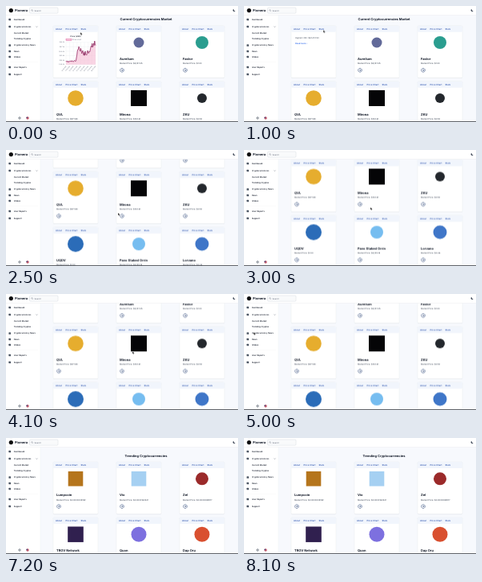
These frames come from a looping animation (290 by 146 pixels, 8200 ms). An HTML page:

```html
<!DOCTYPE html>
<html lang="en">
<head>
<meta charset="utf-8">
<title>Crypto dashboard</title>
<style>
html, body { margin: 0; width: 100%; height: 100%; overflow: hidden; background: #fff; }
svg { display: block; width: 290px; height: 146px; }
text { font-family: Inter, Roboto, sans-serif; text-rendering: geometricPrecision; }
.timed { opacity: 0; animation: 8.2s step-end infinite; }
#market { animation-name: market; }
#loading { animation-name: loading; }
#trending { animation-name: trending; }
#chart { animation-name: chart; }
#stats { animation-name: stats; }
#status { animation-name: status; }
#hover { animation-name: hover; }
#scroll { animation: scroll 8.2s linear infinite; }
#spinner { transform-origin: 175px 28px; animation: spin 8.2s step-end infinite; }
#cursor { animation: point 8.2s ease-in-out infinite, show 8.2s step-end infinite; }
@keyframes market { 0% { opacity: 1 } 73.171% { opacity: 0 } }
@keyframes loading { 73.171% { opacity: 1 } 86.585% { opacity: 0 } }
@keyframes trending { 86.585%, 100% { opacity: 1 } }
@keyframes chart { 0% { opacity: 1 } 8.537% { opacity: 0 } }
@keyframes stats { 8.537%, 100% { opacity: 1 } }
@keyframes status { 68.293% { opacity: 1 } 80.488% { opacity: 0 } }
@keyframes hover { 65.854% { opacity: 1 } 80.488% { opacity: 0 } }
@keyframes spin { 82.927%, 100% { transform: rotate(90deg) } }
@keyframes scroll {
  0%, 21.951% { transform: translateY(-5.3px) }
  23.171% { transform: translateY(-6.5px) }
  30.488% { transform: translateY(-73px); animation-timing-function: ease-out }
  37.805%, 39.634% { transform: translateY(-88.5px); animation-timing-function: ease-in-out }
  50%, 100% { transform: translateY(-59px) }
}
@keyframes point {
  0% { transform: translate(93px, 33px) }
  6%, 11% { transform: translate(98px, 29px) }
  21.951%, 24% { transform: translate(143px, 78px) }
  30.488% { transform: translate(140px, 79px) }
  36.585%, 51% { transform: translate(158px, 72px) }
  61% { transform: translate(12px, 48px) }
  65.854%, 73.17% { transform: translate(20px, 41px) }
  73.171%, 79% { transform: translate(70px, 69px) }
  80.488%, 100% { transform: translate(71px, 71px) }
}
@keyframes show { 0% { opacity: 1 } 86.585%, 100% { opacity: 0 } }
</style>
</head>
<body>
<svg id="stage" viewBox="0 0 290 146"></svg>
<script>
const INK = '#111827', GREY = '#6b7280', BLUE = '#2f56b0';

const rect = (x, y, w, h, fill, extra = '') =>
  `<rect x="${x}" y="${y}" width="${w}" height="${h}" fill="${fill}" ${extra}/>`;
const dot = (x, y, r, fill, extra = '') =>
  `<circle cx="${x}" cy="${y}" r="${r}" fill="${fill}" ${extra}/>`;
const line = (d, color, width, fill = 'none') =>
  `<path d="${d}" fill="${fill}" stroke="${color}" stroke-width="${width}"/>`;
// y is the visual middle of the line of text
const text = (x, y, size, str, color = INK, weight = 400, anchor = 'start') =>
  `<text x="${x}" y="${y + size * 0.36}" font-size="${size}" fill="${color}" font-weight="${weight}" text-anchor="${anchor}">${str}</text>`;
const group = (attrs, body) => `<g ${attrs}>${body}</g>`;
const heading = (y, str) => text(175, y, 4, str, INK, 650, 'middle');

function priceChart() {
  let seed = 11;
  const random = () => (seed = seed * 16807 % 2147483647) / 2147483647;
  const points = [];
  for (let i = 0; i <= 60; i++) {
    const u = i / 60;
    const base = u < 0.33 ? 45.5 - 3 * u : u < 0.42 ? 44.5 - (u - 0.33) * 190 : 30 + 8 * Math.sin(u * 9 + 2.2) * u;
    points.push(`${(16 + 37 * u).toFixed(2)},${(base + (random() - 0.5) * (u < 0.33 ? 2 : 6)).toFixed(2)}`);
  }
  const path = 'M' + points.join('L');
  let out = text(28, 13, 2.4, 'Price (USD)', INK, 500, 'middle') +
    rect(16, 16.5, 7, 2.4, '#f8cfe0', 'stroke="#d6458f" stroke-width=".4"') +
    text(24, 17.8, 2.2, 'Price chart', GREY);
  for (let i = 0; i < 6; i++) {
    const y = 21 + i * 5.6;
    out += line(`M15 ${y}H53`, '#e5e7eb', 0.3) + text(14, y, 2, `$${(68 - i * 0.8).toFixed(1)}k`, GREY, 400, 'end');
  }
  for (let i = 0; i < 9; i++) {
    const x = 16 + i * 4.6;
    out += line(`M${x} 21V49`, '#e5e7eb', 0.3) +
      group(`transform="translate(${x} 51) rotate(-50)"`, text(0, 0, 1.9, `${10 + i}:00 PM`, GREY, 400, 'end'));
  }
  return out + `<path d="${path}V49H16Z" fill="#f6bfd6" opacity=".65"/>` +
    line(path, '#c93d85', 0.7) + line(path, '#3b1d32', 0.25);
}

const action = line('M7 53.7a2.4 2.4 0 1 0 .01 0M5.9 56.1h2.2M7.2 55.1l1 1-1 1', '#1e3a6e', 0.5);

function coinBody({ name, price, color, shape, size }) {
  const mark = shape === 'square'
    ? rect(28 - size, 21.3 - size, size * 2, size * 2, color)
    : dot(28, 21.3, size, color);
  return mark + text(4, 41.8, 4, name, INK, 650) +
    text(4, 47.8, 2.6, `Market Price: $${price}`, '#374151') + action;
}

const statsBody = text(5, 15, 2.6, 'Highest 24h: $67,412.50', '#4b5563') +
  text(5, 22, 2.6, 'Read more ›', '#2563eb', 500);

function card(body, index) {
  const x = 59 + index % 3 * 79, y = 30 + Math.floor(index / 3) * 70;
  return group(`transform="translate(${x} ${y})"`,
    rect(0, 0.3, 56, 66, '#dfe3ea', 'rx="1.2"') +
    rect(0, 0, 56, 65.8, '#fff', 'rx="1.2" stroke="#e5e7eb" stroke-width=".4"') +
    rect(0, 0, 56, 8, '#f1f5fc', 'rx="1.2"') +
    text(3, 4, 2.8, 'About', BLUE, 500) + text(15.5, 4, 2.8, 'Price Chart', BLUE, 500) +
    text(34.5, 4, 2.8, 'Stats', BLUE, 500) + body);
}

const coin = (name, price, color, size, shape = 'circle') => ({ name, price, color, size, shape });
const marketCoins = [
  coin('Aurelium', '3,127.45', '#626a99', 6.5),
  coin('Fastor', '1.00', '#2a9d8f', 8),
  coin('QVL', '571.83', '#e6ad2e', 9.8),
  coin('Mirona', '142.61', '#050507', 10, 'square'),
  coin('ZKU', '0.52', '#24282d', 6),
  coin('UQDV', '1.00', '#2b6cb8', 10),
  coin('Pavo Staked Orrin', '3,125.18', '#76bdf0', 8),
  coin('Lorvano', '0.46', '#3f76c8', 8.5)
];
const trendingCoins = [
  coin('Lumpcoin', '0.0000003182', '#b5751c', 9.3, 'square'),
  coin('Vio', '0.0000160241', '#a5d0f2', 9.3, 'square'),
  coin('Zel', '0.0000082917', '#9b2a2a', 8),
  coin('TROV Network', '0.0000021', '#30204f', 9.8, 'square'),
  coin('Quon', '0.0000415', '#7d70df', 9.5),
  coin('Dap Oru', '0.0000007', '#d95030', 9.5)
];

const firstCard = group('id="chart" class="timed"', priceChart()) + group('id="stats" class="timed"', statsBody);
const backdrop = rect(43, 11, 247, 135, '#f7f9fd');

const market = group('id="market" class="timed"', backdrop + group('id="scroll"',
  heading(22.3, 'Current Cryptocurrencies Market') +
  [firstCard, ...marketCoins.map(coinBody)].map(card).join('')));

const trending = group('id="trending" class="timed"', backdrop +
  heading(22.5, 'Trending Cryptocurrencies') + trendingCoins.map(coinBody).map(card).join(''));

const footerLinks = [[63, 'Terms'], [72, 'Privacy Policy'], [92, 'Licensing'], [106, 'Contact']];
const loading = group('id="loading" class="timed"',
  rect(43, 11, 247, 71, '#f7f9fd') + heading(21.7, 'Trending Cryptocurrencies') +
  group('id="spinner"', dot(175, 28, 1.7, 'none', 'stroke="#d1d5db" stroke-width=".6"') +
    line('M175 26.3a1.7 1.7 0 0 1 1.7 1.7', '#2563eb', 0.6)) +
  rect(58, 52, 229, 12.5, '#fff', 'rx="1" stroke="#e8ebf0" stroke-width=".4"') +
  footerLinks.map(([x, str]) => text(x, 58, 2.5, str, GREY)).join('') +
  [266.5, 274, 281.5].map(x => dot(x, 58, 1.3, '#6b7280')).join('') +
  text(172, 73, 2.5, '© 2021-2024 Plomera. All rights reserved.', GREY, 400, 'middle'));

const menu = [
  [17, 'Dashboard'], [26, 'Cryptocurrencies'], [34, 'Current Market', 1], [41.3, 'Trending Cryptos', 1],
  [49.5, 'Cryptocurrency News'], [57, 'News'], [64, 'Videos'], [77, 'User Reports'], [86, 'Support']
];
const sidebar = rect(0, 11, 43, 135, '#fff') + line('M43 11V146', '#e9ecf1', 0.4) +
  group('id="hover" class="timed"', rect(2, 38, 39, 6.6, '#f1f3f6', 'rx="1"')) +
  line('M3 70.5H40', '#eceef2', 0.3) +
  menu.map(([y, str, sub]) => (sub ? '' : rect(3.4, y - 1.3, 2.6, 2.6, '#4b5563', 'rx=".6"')) +
    text(9.7, y, 2.6, str, INK, 500)).join('') +
  line('M37.6 25.6l.9.9.9-.9', '#374151', 0.4) +
  dot(17, 141, 1.2, 'none', 'stroke="#4b5563" stroke-width=".7"') +
  dot(27, 141, 1.7, '#c4586a') + rect(25.5, 139.8, 1.5, 1.3, '#39477f');

const header = rect(0, 0, 290, 11.5, '#fff') + line('M0 11.5H290', '#e5e7eb', 0.4) +
  dot(6.3, 5.6, 2.6, '#0b0b0d') + text(11, 5.6, 4, 'Plomera', INK, 700) +
  rect(29.5, 2, 35.5, 7.2, '#f9fafb', 'rx="1.2" stroke="#cfd4dc" stroke-width=".4"') +
  dot(32.5, 5.4, 0.8, 'none', 'stroke="#6b7280" stroke-width=".35"') +
  line('M33.1 6l.8.8', GREY, 0.35) + text(35.5, 5.6, 2.6, 'Search', GREY) +
  `<path d="M284.8 3.7a1.7 1.7 0 1 0 1.9 2.5 1.8 1.8 0 0 1-1.9-2.5Z" fill="#374151"/>`;

const edge = rect(0, 145.1, 290, 0.9, '#4d5157');
const status = group('id="status" class="timed"', rect(0, 143.6, 27, 2.4, '#dce8fa') +
  text(0.6, 144.9, 1.9, 'localhost:5173/trending', '#2563eb'));
const cursor = group('id="cursor"',
  '<path d="M0 0V3.4L.85 2.7 1.4 3.9 2 3.6 1.5 2.45H2.6Z" fill="#111" stroke="#fff" stroke-width=".3"/>');

document.getElementById('stage').innerHTML =
  rect(0, 0, 290, 146, '#fff') + market + loading + trending + sidebar + header + edge + status + cursor;
</script>
</body>
</html>
```
